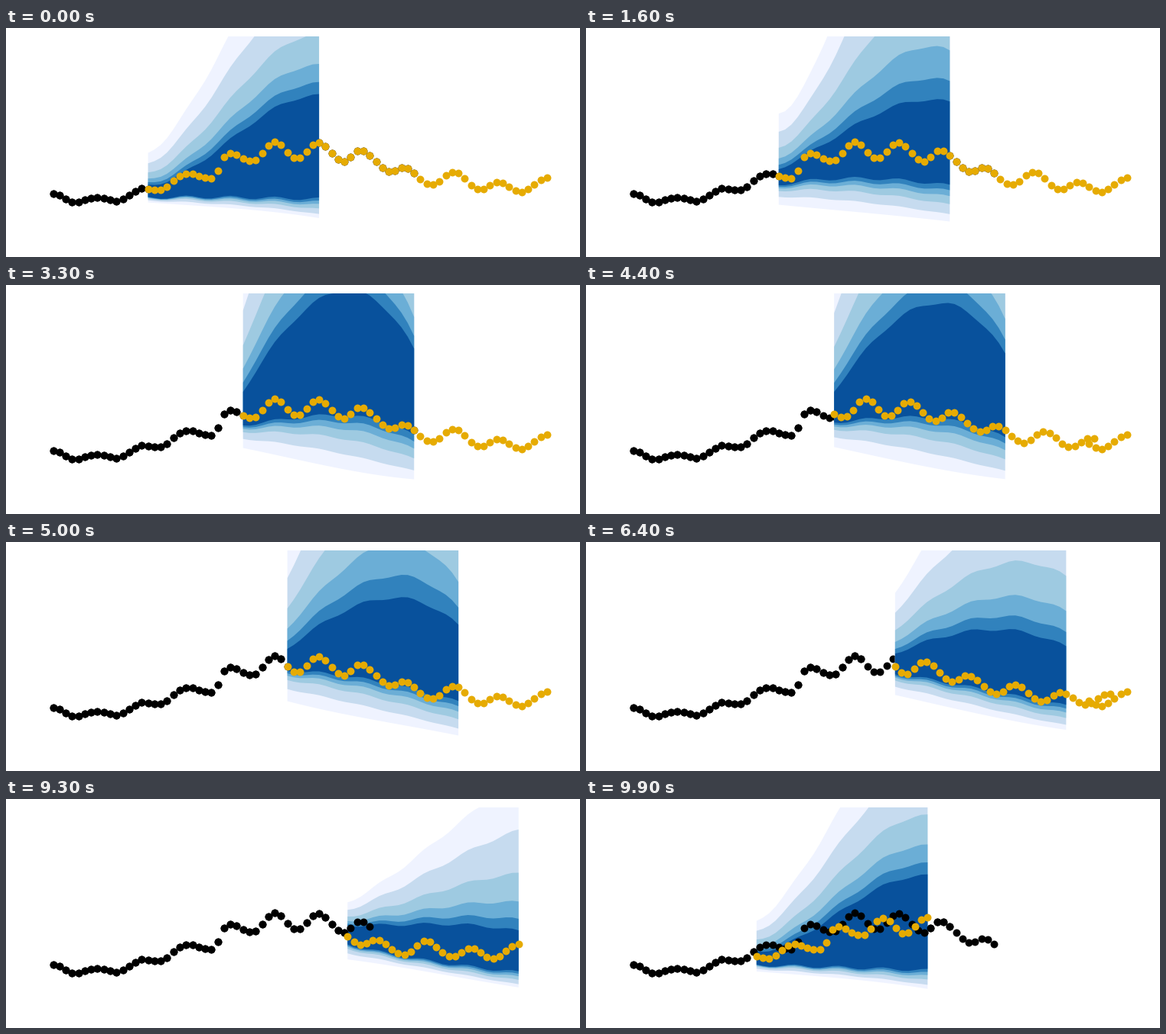
Write a matplotlib script that moves like this. It is 750 px wide and 300 px high and loops after 10000 ms.

```python
import numpy as np
import matplotlib.pyplot as plt
from matplotlib.animation import FuncAnimation
from matplotlib.patches import Polygon, Rectangle

W, H, DPI = 750, 300, 100
FRAMES, INTERVAL, STEPS = 100, 100, 8
COUNT = 79           # points in the series
SPAN = 28            # points in one forecast window
KNOWN = 58           # points in the fixed layer behind the fan
PERIOD = 7           # length of the weekly wave in points
RIPPLE = 2
PANEL_TOP = 10.5
RADIUS = 4.95
BLUES = ["#eff3ff", "#c6dbef", "#9ecae1", "#6baed6", "#3182bd", "#08519c"]
GOLD = "#e6ab02"

# Turning points of the series as (index, y).
TURNS = [(0, 216), (3.4, 227.6), (6.8, 221.2), (10, 226), (14.3, 209.8),
         (16.7, 211.5), (21.1, 190), (25, 196.5), (27.7, 163), (31.5, 173.8),
         (35, 148.2), (38.5, 170.8), (41.8, 149), (45.9, 174.7), (48.4, 160),
         (53.4, 187.8), (55.2, 182), (59.8, 204.9), (63.2, 188),
         (67.4, 211), (70.3, 201.6), (73.8, 214.4), (78, 195.5)]

# Distance of each band from the innermost one, widest first.
RISE_LEVELS = np.array([2.6, 1.75, 1, 0.5, 0.2, 0])
FALL_LEVELS_NEAR = np.array([1, 0.6, 0.3, 0.16, 0.08, 0])
FALL_LEVELS_FAR = np.array([1, 0.8, 0.53, 0.31, 0.15, 0])


def wave_through(turns, index):
    """Half cosine waves from one turning point to the next."""
    at, y = np.array(turns).T
    i = np.clip(np.searchsorted(at, index, side="right") - 1, 0, len(at) - 2)
    t = (index - at[i]) / (at[i + 1] - at[i])
    return y[i] + (y[i + 1] - y[i]) * (1 - np.cos(np.pi * t)) / 2


index = np.arange(COUNT)
points = np.column_stack([61 + 8.275 * index, wave_through(TURNS, index)])


def fan(start, top, rise, bottom, fall):
    """Outlines of all bands; each argument is a cubic through four heights."""
    u = np.linspace(0, 3, SPAN)
    top, rise, bottom, fall = (np.polyval(np.polyfit(range(4), keys, 3), u)
                               for keys in (top, rise, bottom, fall))
    x = points[start:start + SPAN, 0]
    ripple = -RIPPLE * np.cos(2 * np.pi * (start + np.arange(SPAN)) / PERIOD)
    bands = []
    for up, near, far in zip(RISE_LEVELS, FALL_LEVELS_NEAR, FALL_LEVELS_FAR):
        down = near + (far - near) * u / 3
        upper = top + ripple - up * rise
        lower = bottom + ripple * (1 - down) + down * fall
        bands.append(np.column_stack([np.r_[x, x[::-1]],
                                      np.r_[upper, lower[::-1]]]))
    return start, np.array(bands)


STATES = [
    fan(15, top=(206, 171, 115, 88), rise=(16, 40, 68, 79),
        bottom=(222, 221, 222, 223.5), fall=(6, 12, 17, 25)),
    fan(23, top=(184, 142, 103, 97), rise=(28, 62, 122, 134),
        bottom=(205, 197, 198, 206), fall=(26, 41, 47, 47)),
    fan(30, top=(139, 38, 8, 84), rise=(61, 110, 120, 83),
        bottom=(183, 173, 172, 197), fall=(30, 56, 72, 57)),
    fan(37, top=(139, 90, 73, 109), rise=(53, 112, 146, 112),
        bottom=(168, 175, 189, 209), fall=(40, 50, 50, 44)),
    fan(44, top=(149, 139, 140, 154), rise=(17, 35, 54, 80),
        bottom=(175, 191, 206, 217), fall=(20, 21, 23, 24)),
    fan(51, top=(159, 163, 171, 185), rise=(11, 28, 50, 75),
        bottom=(185, 204, 217, 227), fall=(22, 15, 16, 19)),
]
ARRIVALS = [0, 16, 33, 50, 67, 84, FRAMES]

fig = plt.figure(figsize=(W / DPI, H / DPI), dpi=DPI, facecolor="white")
ax = fig.add_axes([0, 0, 1, 1])
ax.set(xlim=(-0.5, W - 0.5), ylim=(H - 0.5, -0.5))   # whole numbers are pixel centres
ax.axis("off")


def dots(xy, color, zorder):
    size = (2 * RADIUS * 72 / DPI) ** 2
    return ax.scatter(*xy.T, s=size, c=color, linewidths=0, zorder=zorder)


dots(points[:KNOWN], "black", 1)
panel = Rectangle((-0.5, PANEL_TOP), W, H, transform=ax.transData)
ribbons = []
for shade, outline in zip(BLUES, STATES[0][1]):
    ribbon = ax.add_patch(Polygon(outline, facecolor=shade, linewidth=0, zorder=2))
    ribbon.set_clip_path(panel)
    ribbons.append(ribbon)
history = dots(points[:1], "black", 3)
future = dots(points[1:], GOLD, 4)


def draw(frame):
    i = np.searchsorted(ARRIVALS, frame, side="right") - 1
    t = max(0, (frame - ARRIVALS[i + 1] + STEPS) / STEPS)
    start, bands = STATES[i]
    next_start, next_bands = STATES[(i + 1) % len(STATES)]

    for ribbon, a, b in zip(ribbons, bands, next_bands):
        ribbon.set_xy(a + (b - a) * t)

    # Unpaired points stay until the move ends; new ones appear only then.
    gold, target = points[start:].copy(), points[next_start:]
    n = min(len(gold), len(target))
    gold[:n] += (target[:n] - gold[:n]) * t
    future.set_offsets(gold)
    history.set_offsets(points[:start])
    return [*ribbons, history, future]


anim = FuncAnimation(fig, draw, frames=FRAMES, interval=INTERVAL,
                     repeat=True, repeat_delay=0, blit=False)
plt.show()
```
